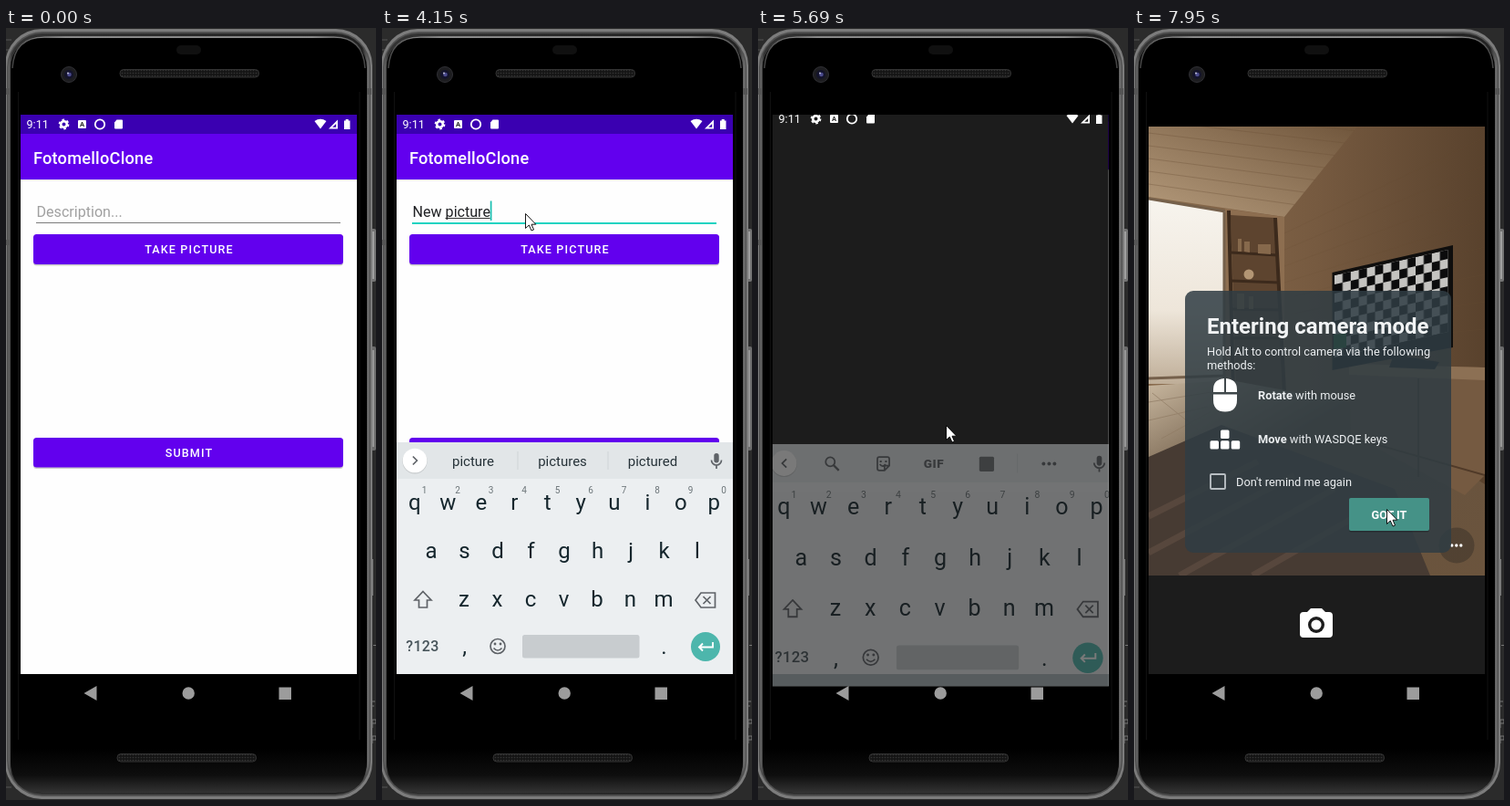
An HTML page that plays this animation: 406 by 846 pixels, repeating every 8000 ms.

```html
<!DOCTYPE html>
<html lang="en">
<head>
<meta charset="utf-8">
<title>Phone camera demo</title>
<style>
html, body { margin: 0; width: 100%; height: 100%; overflow: hidden; background: #2b2b2b; }
svg { display: block; width: 406px; height: 846px; font-family: Roboto, sans-serif; }
.mid { text-anchor: middle; }
.btn { font-size: 12.6px; font-weight: 500; letter-spacing: .0893em; fill: #fff; text-anchor: middle; }
.ic { fill: none; stroke: #5f6368; stroke-width: 1.7; }
.body { font-size: 12.8px; fill: #eceff1; }
.b { font-weight: 700; }
</style>
</head>
<body>
<svg viewBox="0 0 406 846">
<defs>
  <clipPath id="glass"><rect x="16" y="95" width="369" height="626.5"/></clipPath>
  <clipPath id="takeClip"><rect x="30" y="226" width="340" height="33" rx="3.5"/></clipPath>
  <clipPath id="viewClip"><rect x="16" y="108" width="369" height="492"/></clipPath>
  <pattern id="dots" width="3" height="3" patternUnits="userSpaceOnUse"><rect width="3" height="3" fill="#151515"/><circle cx="1.5" cy="1.5" r=".8" fill="#343434"/></pattern>
  <pattern id="checks" width="20" height="20" patternUnits="userSpaceOnUse"><rect width="20" height="20" fill="#0c0c0d"/><path d="M0 0h10v20h10V10H0z" fill="#c4c3c0"/></pattern>
  <linearGradient id="chin" x2="0" y2="1"><stop offset="0" stop-color="#000"/><stop offset=".6" stop-color="#0e0e0e"/><stop offset="1" stop-color="#333"/></linearGradient>
  <linearGradient id="shine"><stop offset="0" stop-color="#444"/><stop offset=".15" stop-color="#b5b5b5"/><stop offset=".85" stop-color="#b5b5b5"/><stop offset="1" stop-color="#444"/></linearGradient>
  <linearGradient id="rim"><stop offset="0" stop-color="#6a6a6a"/><stop offset=".01" stop-color="#333"/><stop offset=".98" stop-color="#222"/><stop offset="1" stop-color="#777"/></linearGradient>
  <linearGradient id="ceiling" x1="0" y1="1" x2="1" y2="0"><stop offset="0" stop-color="#b59b7c"/><stop offset="1" stop-color="#70563c"/></linearGradient>
  <linearGradient id="wall"><stop offset="0" stop-color="#8a6c4e"/><stop offset=".5" stop-color="#765a40"/><stop offset="1" stop-color="#59422d"/></linearGradient>
  <linearGradient id="sky" x2="0" y2="1"><stop offset="0" stop-color="#f7f4ee"/><stop offset=".6" stop-color="#eee6da"/><stop offset="1" stop-color="#bfae98"/></linearGradient>
  <linearGradient id="floor" x1="0" y1="0" x2="1" y2="1"><stop offset="0" stop-color="#c9b8a0"/><stop offset=".35" stop-color="#66533f"/><stop offset="1" stop-color="#6b543d"/></linearGradient>
  <g id="camIcon"><path d="M-6-16H6l4 4h4q4 0 4 4V12q0 4-4 4H-14q-4 0-4-4V-8q0-4 4-4h4z"/></g>
</defs>

<rect width="406" height="846" fill="#2b2b2b"/>
<g stroke="#777" fill="none">
  <path d="M402.5 582v40M403 676.5h3M402 738h3M402 743h2M402 758v9M402 758h4v4h-4M402 776v8M402 776h4v4h-4"/>
  <path d="M0 13h6M0 24h5M0 231h6M0 240h5M0 832h6" stroke="#555"/>
</g>
<rect x="399" y="220" width="7" height="58" rx="2" fill="#737373"/><rect x="402" y="223" width="2" height="52" fill="#a0a0a0"/>
<rect x="399" y="349" width="7" height="114" rx="2" fill="#6c6c6c"/><rect x="402" y="353" width="2" height="106" fill="#979797"/>
<rect x="-1" y="1" width="403" height="844" rx="40" fill="#7c7c7c"/>
<rect x="1" y="4" width="399" height="838" rx="39" fill="#505050"/>
<rect x="2.5" y="6" width="396" height="834" rx="37" fill="url(#rim)"/>
<path d="M0 66h4v7H0zM396 66h5v7h-5zM0 232h4v6H0z" fill="#555"/>
<rect x="5" y="9" width="391" height="829" rx="35"/>
<path d="M7 44Q9 10 42 10H360Q392 10 394 44" fill="none" stroke="url(#shine)" stroke-width="1.5"/>
<path d="M5 790H396V803Q396 838 361 838H40Q5 838 5 803z" fill="url(#chin)"/>
<path d="M13.5 70V780M388 70V780" stroke="#101010"/>
<rect x="187" y="19" width="27" height="10" rx="5" fill="#101010"/>
<rect x="125" y="45.500" width="152.500" height="8.500" rx="4" fill="url(#dots)" stroke="#343434"/>
<rect x="122" y="795.500" width="152.500" height="8.500" rx="4" fill="url(#dots)" stroke="#343434"/>
<circle cx="69" cy="51" r="8.500" fill="#1d1d20" stroke="#303034"/><circle cx="69" cy="51" r="5" fill="#14142b"/><circle cx="69.500" cy="51" r="2.300" fill="#4a4a8c"/><circle cx="68" cy="49.500" r="1" fill="#c5c5e0"/>

<g clip-path="url(#glass)">
  <g id="app">
    <rect x="16" y="95" width="369" height="613" fill="#fefefe"/>
    <rect x="16" y="166" width="369" height="1.500" fill="#000" opacity=".08"/>
    <rect x="16" y="116" width="369" height="50" fill="#6200ee"/>
    <rect x="16" y="95" width="369" height="21" fill="#3a00b1"/>
    <text x="30" y="148.500" font-size="18.200" font-weight="500" letter-spacing=".22" fill="#fff">FotomelloClone</text>
    <text id="field" x="33.500" y="206.800" font-size="16.100"></text>
    <path id="compose" stroke="#333"/>
    <rect id="rule" x="33" width="334"/>
    <rect id="caret" y="189.500" width="1.700" height="21.500" fill="#17bfb0"/>
    <rect x="30" y="227" width="340" height="33.500" rx="3.500" opacity=".2"/>
    <rect x="30" y="226" width="340" height="33" rx="3.500" fill="#6200ee"/>
    <g clip-path="url(#takeClip)"><circle id="ripple" cx="195.500" cy="251" fill="#fff"/></g>
    <text class="btn" x="201" y="247.300">TAKE PICTURE</text>
    <rect x="30" y="450" width="340" height="33" rx="3.500" opacity=".2"/>
    <rect x="30" y="449" width="340" height="32.500" rx="3.500" fill="#6200ee"/>
    <text class="btn" x="201" y="470">SUBMIT</text>
  </g>
  <rect id="dark" x="16" y="95" width="368" height="626.500" fill="#1c1c1c"/>

  <g id="board">
    <rect x="16" y="454" width="369" height="254" fill="#eceff1"/>
    <rect x="16" y="454" width="369" height="40" fill="#e2e6e8"/>
    <circle cx="36" cy="474.800" r="13.600" opacity=".13"/><circle cx="36" cy="474" r="13.300" fill="#fff"/>
    <path id="chev" d="M38.500 469.500L34 474l4.500 4.500" class="ic"/>
    <g id="tools">
      <g class="ic"><circle cx="84.500" cy="472.500" r="4.800"/><path d="M88 476l5.500 5.500" stroke-width="2.200"/>
      <path d="M136 467.500h8.500q2 0 2 2v7l-5 5h-5.500q-2 0-2-2v-10q0-2 2-2zM141.500 481v-4.500h5M136.500 475q3 4 6 0"/></g>
      <path d="M136.500 471h2v2h-2zM142 471h2v2h-2z" fill="#5f6368"/>
      <text class="mid" x="193.300" y="478.700" font-size="13" font-weight="900" letter-spacing=".5" fill="#5f6368">GIF</text>
      <rect x="241" y="467" width="15.500" height="15.500" rx="1.500" fill="#6c7175"/>
      <path d="M281 464v20" stroke="#cfd4d7"/>
      <g fill="#5f6368"><circle cx="308.500" cy="474.500" r="1.900"/><circle cx="314.300" cy="474.500" r="1.900"/><circle cx="320" cy="474.500" r="1.900"/></g>
    </g>
    <g id="hints" font-size="15" fill="#263238" class="mid"><text x="100" y="480"></text><text x="198" y="480"></text><text x="297" y="480"></text><path d="M149 464v20M248 464v20" stroke="#cfd4d7"/></g>
    <rect x="364.300" y="466" width="5.400" height="10.500" rx="2.700" fill="#5f6368"/><path d="M361.500 473.500a5.500 5.500 0 0 0 11 0M367 479v4" class="ic"/>
    <g id="keys" fill="#15262d"></g>
    <g class="ic" stroke-width="1.900"><path d="M45 617.500l9 9.500h-4.500v8h-9v-8h-4.500z"/><path d="M350 619h15.500v16H350l-6-8zM352.500 623l8 8M360.500 623l-8 8"/><circle cx="127" cy="677.500" r="8"/><path d="M122.500 679.500q4.500 5 9 0"/></g>
    <circle cx="124" cy="675" r="1.400" fill="#5f6368"/><circle cx="130" cy="675" r="1.400" fill="#5f6368"/>
    <text class="mid" x="44.500" y="683" font-size="16" font-weight="500" letter-spacing=".3" fill="#47545a">?123</text>
    <rect x="154" y="665" width="128.500" height="25.500" rx="2.500" fill="#c8cccf"/>
    <circle cx="355" cy="678" r="16" fill="#4db6ac"/><path d="M363 673v5.500h-15M352 674.500l-4 4 4 4" fill="none" stroke="#fff" stroke-width="1.900"/>
  </g>
  <rect id="edge" x="16" y="708" width="369" height="13.500" fill="#1c2a30" opacity=".3"/>

  <g id="status" fill="#fff">
    <text x="22.500" y="110.300" font-size="12.600">9:11</text>
    <circle cx="63.500" cy="105.500" r="3.300" fill="none" stroke="#fff" stroke-width="2.600"/><circle cx="63.500" cy="105.500" r="5" fill="none" stroke="#fff" stroke-width="1.800" stroke-dasharray="2.600 2.636"/>
    <rect x="79" y="101" width="9" height="9" rx="1"/><text class="mid b" x="83.500" y="108.300" font-size="7.500" fill="#222">A</text>
    <circle cx="103" cy="105.500" r="5.200" fill="none" stroke="#fff" stroke-width="1.800"/>
    <path d="M121.500 100.500h5.500q1 0 1 1v8q0 1-1 1h-7q-1 0-1-1v-6z"/>
    <path d="M338.500 102q6.500-4.500 13 0l-6.500 8.500z"/><path d="M364 100.500v10h-10zM362.200 105v3.800h-4z" fill-rule="evenodd"/>
    <path d="M371 101.500h1.700v-1.500h3v1.500h1.800v9.500h-6.500z"/>
  </g>

  <g id="camera">
    <rect x="16" y="95" width="369" height="613"/>
    <g clip-path="url(#viewClip)">
      <rect x="16" y="108" width="369" height="492" fill="url(#wall)"/>
      <path d="M16 108H245L165 207L16 185z" fill="url(#ceiling)"/>
      <g id="planks" stroke="#6b5037" fill="none" opacity=".35"></g>
      <path d="M165 207V400H100V198z" fill="#8d6e50"/>
      <path d="M16 187l84 14V390H16z" fill="url(#sky)"/>
      <path d="M16 187l84 14M16 384l84-3M99 202v184" stroke="#75604b" stroke-width="3"/>
      <path d="M106 205l48 3 10 190h-52z" fill="#5d442f"/>
      <path d="M104 200l5 200M155 208l10 192" stroke="#3c2a1c" stroke-width="4"/>
      <path d="M106 246l52 3M107 277l53 2M108 308l53 1M109 340h54" stroke="#3c2a1c" stroke-width="3"/>
      <path d="M114 245v-14h4v14m3 0v-11h6v12M136 247v-10h14v11M113 308v-17h8v17m5 0v-14h5v14" fill="#86694c"/>
      <circle cx="126" cy="270" r="5.500" fill="#b39674"/>
      <path d="M16 392l90-6 130 24 149 90V600H16z" fill="url(#floor)"/>
      <path d="M16 410l75-12M16 430l65-15M30 450l55-30M20 400l50 40" stroke="#8f7b64" opacity=".7"/>
      <path d="M16 470l80-35 190 70L325 600H16z" fill="#473b33"/>
      <path d="M16 535l120-60M16 575l160-85M50 600l170-95M130 600l140-80" stroke="#635044" stroke-width="7" opacity=".6"/>
      <path d="M236 368l149 4V490l-22 22-125-67z" fill="#755a41"/><path d="M236 368l149 4v14l-149-6z" fill="#8c7054"/><path d="M312 384v108M240 449l145 41" stroke="#503a28" stroke-width="2"/>
      <path d="M285 358l50 8-5 8-50-2z" fill="#171513"/>
      <path d="M217.500 268L350 238V350L217.500 375z" fill="#0f0e0d"/>
      <rect width="140" height="90" transform="matrix(.890 -.200 0 1 220 271)" fill="url(#checks)"/>
      <path d="M219 336l14-2v16l-14 2z" fill="#0d6a2e"/>
    </g>
    <circle cx="354" cy="567" r="19.500" fill="#1c1c1c" opacity=".32"/>
    <g fill="#fff"><circle cx="348.800" cy="567" r="1.700"/><circle cx="353.800" cy="567" r="1.700"/><circle cx="358.800" cy="567" r="1.700"/></g>
    <rect x="16" y="600" width="369" height="108" fill="#1c1c1c"/>
    <g transform="translate(200 652)"><use href="#camIcon" fill="#fff"/><circle cy="2" r="9" fill="#1c1c1c"/><circle cy="2" r="5.600" fill="#fff"/></g>
    <rect id="cover" x="16" y="95" width="369" height="613" fill="#1c1c1c"/>
    <g id="splash" transform="translate(200.500 398) scale(1.300)"><use href="#camIcon" fill="#777"/><circle cy="2" r="9.500" fill="#1c1c1c"/><circle cy="2" r="6" fill="#777"/></g>
    <g id="dialog">
      <rect x="56" y="288" width="292" height="287" rx="9" fill="#303c43" opacity=".85"/>
      <text x="80" y="335" font-size="24" class="b" fill="#f1f3f4">Entering camera mode</text>
      <g class="body"><text x="80" y="359.300">Hold Alt to control camera via the following</text><text x="80" y="374">methods:</text>
      <text x="136" y="407.300"><tspan class="b">Rotate</tspan> with mouse</text><text x="136" y="455.300"><tspan class="b">Move</tspan> with WASDQE keys</text>
      <text x="112" y="501.800">Don't remind me again</text></g>
      <g fill="#fff"><path d="M87 399v-3q0-11 12-12v15zM101 384q12 1 12 12v3h-12zM87 401.500h26v6q0 13-13 13t-13-13z"/>
      <rect x="95" y="440.500" width="9.500" height="9.500" rx="1.500"/><rect x="83.500" y="452.300" width="9.500" height="9.200" rx="1.500"/><rect x="95" y="452.300" width="9.500" height="9.200" rx="1.500"/><rect x="106.700" y="452.300" width="9.500" height="9.200" rx="1.500"/></g>
      <rect x="84" y="489" width="16" height="16" rx="1" fill="none" stroke="#b8bec2" stroke-width="1.900"/>
      <rect x="236" y="516.500" width="88" height="36" rx="2" opacity=".25"/><rect x="236" y="515" width="88" height="36" rx="2" fill="#459287"/>
      <text x="280" y="538.200" class="mid b" font-size="12.700" fill="#fff">GOT IT</text>
    </g>
  </g>
</g>
<path fill="#9c9c9c" d="M85.500 729l14-8v16zM193.500 729a6.700 6.700 0 1 0 13.400 0a6.700 6.700 0 1 0-13.400 0zM299.500 722.500h13.500v13.500h-13.500z"/>
<path id="mouse" d="M.5.500V16.500L4.300 13L7 19L9.500 18L7 12.200H11.800z" fill="#fff" stroke="#000" stroke-width=".9"/>
</svg>
<script>
const $ = id => document.getElementById(id);
const set = (id, attrs) => { for (const k in attrs) $(id).setAttribute(k, attrs[k]); };
const show = (id, on) => { $(id).style.display = on ? '' : 'none'; };
const LOOP = 8000;

// Picture updates: first time, last time, count
const spans = [[0, 0, 1], [130, 190, 2], [360, 920, 8], [1000, 1150, 3], [1220, 1220, 1],
  [1380, 1380, 1], [1530, 1680, 3], [2230, 2230, 1], [2690, 2850, 3], [3000, 3160, 3],
  [3380, 3460, 2], [3690, 3860, 3], [4150, 4310, 3], [4690, 5000, 5], [5150, 5380, 4],
  [5460, 5690, 4], [5770, 5930, 3], [6240, 6620, 6], [6700, 7030, 5], [7090, 7640, 8],
  [7800, 7800, 1], [7950, 7950, 1]];
const ticks = spans.flatMap(([a, b, n]) =>
  Array.from({ length: n }, (_, i) => n > 1 ? Math.round(a + (b - a) * i / (n - 1)) : a));

const route = [[130, 259, 631], [190, 152, 323], [360, 140, 297], [520, 119, 238], [680, 138, 212],
  [920, 168, 201], [1000, 171, 198], [1150, 145, 191], [1220, 157, 196], [1530, 157, 198],
  [1680, 157, 203], [4610, 157, 203], [5000, 189, 251], [5230, 187, 257], [5380, 186, 265],
  [5540, 192, 340], [5690, 206, 435], [5930, 250, 505], [6240, 290, 525], [6620, 331, 538],
  [7030, 326, 541], [7330, 298, 537], [7640, 277, 529], [7800, 277, 528], [7950, 277, 527]];
const typed = [[0, ''], [2690, 'N'], [2850, 'Ne'], [3000, 'New'], [3080, 'New '], [3160, 'New p'],
  [3380, 'New pi'], [3460, 'New pic'], [3690, 'New pict'], [3770, 'New pictu'], [3860, 'New pictur'],
  [4150, 'New picture'], [4230, 'New picture!']];
const words = [[0, ''], [2770, 'No New Now'], [3000, 'New News Newer'], [3160, 'picture post photos'],
  [3380, 'pics picture pictures'], [3690, 'picture pictures pictured'], [4310, '']];
const caretOn = [[0, 0], [1380, 1], [2230, 0], [2690, 1], [4840, 0], [5300, 1]];

const last = (rows, t) => rows.filter(r => r[0] <= t).pop();
function mix(rows, t, col = 1) {
  const i = rows.findIndex(r => r[0] > t);
  if (i < 0) return rows[rows.length - 1][col];
  if (!i) return rows[0][col];
  const [a, b] = [rows[i - 1], rows[i]];
  return a[col] + (b[col] - a[col]) * (t - a[0]) / (b[0] - a[0]);
}

let keys = '';
const row = (chars, x, y) => [...chars].forEach((c, i) => {
  keys += `<text class="mid" font-size="24" x="${x + i * 36.5}" y="${y}">${c}</text>`;
});
row('qwertyuiop', 35.8, 528);
row('asdfghjkl', 54, 581);
row('zxcvbnm', 90, 634);
row(',', 90.5, 686);
row('.', 309.5, 686);
[...'1234567890'].forEach((c, i) => {
  keys += `<text class="mid" font-size="10" fill="#6b7478" x="${46.5 + i * 36.5}" y="510">${c}</text>`;
});
$('keys').innerHTML = keys;

let planks = '';
for (let i = 1; i < 8; i++) planks += `<path d="M16 ${185 - i * 14}L${165 + i * 11} ${207 - i * 13.5}"/>`;
for (let i = 1; i < 9; i++) planks += `<path d="M165 ${207 + i * 18}L385 ${90 + i * 30}" opacity=".5"/>`;
$('planks').innerHTML = planks;

function typing(t) {
  const text = last(typed, t)[1], field = $('field');
  field.textContent = text || 'Description...';
  field.setAttribute('fill', text ? '#202124' : '#a0a0a0');
  const end = 33.3 + (text ? field.getComputedTextLength() : 0);
  const start = text.includes(' ') ? 69.5 : 33.5;
  const composing = text && !/[ !]$/.test(text);
  set('compose', { d: composing ? `M${start} 208.500H${end}` : '' });
  const focus = t >= 1380;
  set('rule', { y: 213, height: focus ? 2 : 1, fill: focus ? '#1fd3c1' : '#7b7b7b' });
  set('caret', { x: end, opacity: last(caretOn, t)[1] });

  const list = last(words, t)[1];
  show('tools', !list);
  show('hints', list);
  set('chev', { transform: list ? 'rotate(180 36.200 474)' : '' });
  $('hints').querySelectorAll('text').forEach((el, i) => { el.textContent = list.split(' ')[i] || ''; });
}

function transition(t) {
  const scale = mix([[5460, 1], [5690, 1.045], [5770, 1.05]], t);
  const zoom = `translate(200.500 407) scale(${scale}) translate(-200.500 -407)`;
  const slide = mix([[1530, 170], [1605, 55], [1680, 0]], t);
  const closing = t >= 5540 && t < 5850;
  set('app', { transform: zoom, opacity: mix([[5460, 1], [5610, .3]], t) });
  set('board', { transform: `${zoom} translate(0 ${slide})`, opacity: mix([[5460, 1], [5690, .41], [5850, 0]], t) });
  show('app', t < 5850);
  show('board', t >= 1530 && t < 5850);
  show('edge', closing);
  set('dark', {
    opacity: mix([[5460, 0], [5610, .95], [5690, 1]], t),
    height: closing ? 626.5 : 613,
    width: t < 5850 ? 368 : 369
  });
  set('status', { transform: `translate(0 ${mix([[5540, 0], [5690, -6], [5850, -22]], t)})` });
  set('ripple', { r: mix([[5150, 0], [5230, 45], [5380, 145], [5460, 200]], t), opacity: mix([[5380, .24], [5540, .1]], t) });
}

function camera(t) {
  show('camera', t >= 5930);
  set('cover', { opacity: mix([[6390, 1], [6620, .56], [7030, 0]], t) });
  set('splash', { opacity: mix([[6390, 1], [6620, .4], [6780, 0]], t) });
  set('dialog', { opacity: mix([[6160, 0], [6390, 1]], t) });
}

function render(t) {
  typing(t);
  transition(t);
  camera(t);
  show('mouse', t >= 130);
  set('mouse', { transform: `translate(${Math.round(mix(route, t))} ${Math.round(mix(route, t, 2))})` });
}

let shown = -1;
function frame(now) {
  const t = now % LOOP, tick = ticks.filter(v => v <= t).pop();
  if (tick !== shown) render(shown = tick);
  requestAnimationFrame(frame);
}
render(0);
requestAnimationFrame(frame);
</script>
</body>
</html>
```
